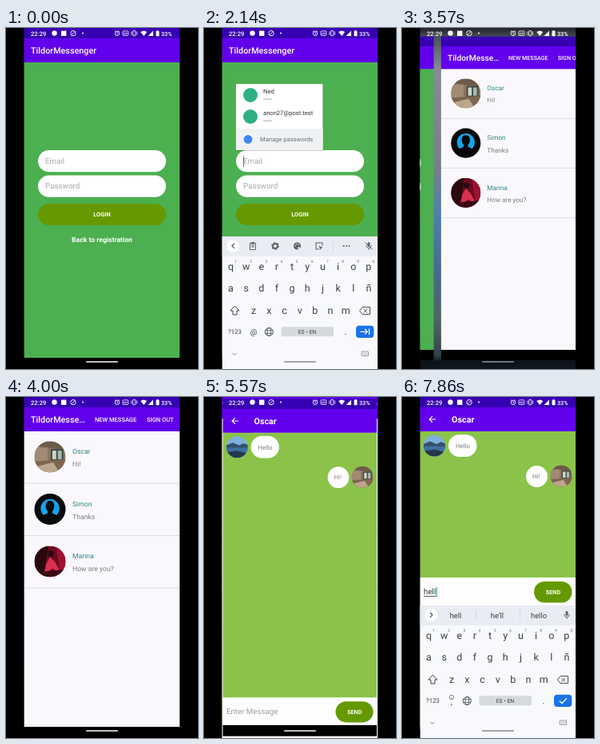
An HTML page for the animation above (8000 ms loop, 240 by 427 pixels).

```html
<!DOCTYPE html>
<html lang="en">
<head>
<meta charset="utf-8">
<title>Messenger walkthrough</title>
<style>
  html, body { margin: 0; width: 100%; height: 100%; overflow: hidden; background: #000; }
  svg { display: block; width: 100vw; height: 100vh; font-family: Roboto, sans-serif; text-rendering: geometricPrecision; }
</style>
</head>
<body>
<svg id="stage" viewBox="0 0 240 427" preserveAspectRatio="none"></svg>
<script>
const LOOP = 8000, STEP = 1000 / 7;
const L = 22.5, W = 194.5;
const PURPLE = '#6200ee', DEEP = '#3700b3', OLIVE = '#669900', CURSOR = '#2b8f9a';
const APP = 'TildorMessenger', SHORT = 'TildorMesse…', FRIEND = 'Oscar', MAIL = 'anon27@post.test';

// --- drawing helpers ---
const rect = (x, y, w, h, fill, r = 0, more = '') =>
  `<rect x="${x}" y="${y}" width="${w}" height="${h}" rx="${r}" fill="${fill}" ${more}/>`;
const circle = (x, y, r, fill, more = '') => `<circle cx="${x}" cy="${y}" r="${r}" fill="${fill}" ${more}/>`;
const text = (x, y, size, fill, str, more = '') =>
  `<text x="${x}" y="${y}" font-size="${size}" fill="${fill}" ${more}>${str}</text>`;
const line = (d, color, w = 1, more = '') =>
  `<path d="${d}" fill="none" stroke="${color}" stroke-width="${w}" ${more}/>`;
const shape = (d, fill) => `<path d="${d}" fill="${fill}"/>`;
const at = (x, y, body, s = 1) => `<g transform="translate(${x} ${y}) scale(${s})">${body}</g>`;
const group = (id, body, more = '') => `<g id="${id}" ${more}>${body}</g>`;
const MID = 'text-anchor="middle"', BOLD = 'font-weight="700"', MEDIUM = 'font-weight="500"';

const frame = (page, body) =>
  rect(L, 0, W, 13.2, DEEP) + rect(L, 13, W, 30, PURPLE) + rect(L, 43, W, 370, page) +
  body + rect(L, 413, W, 14, '#000');

// --- round pictures, drawn in a unit of radius 20 ---
const photo = body => `<g clip-path="url(#round)">${body}</g>`;
const room = photo(
  rect(-20, -20, 40, 40, '#8a7460') + shape('M-20-20H20V-9L-20-14Z', '#6d5a48') +
  rect(-20, -12, 17, 18, '#a08a72') + rect(1, -10, 16, 15, '#3c4a44') + rect(3, -8, 5, 11, '#cfd6c8') +
  rect(10, -8, 5, 11, '#a9b8ab') + shape('M-20 6L20 3V20H-20Z', '#7c6650') + shape('M-16 12L4 7L12 20H-10Z', '#bca78d'));
const person = circle(0, 0, 20, '#080808') + circle(0, -1, 12, '#14a3ee') +
  shape('M-5.5-5a5.5 6 0 0 1 11 0c0 4-1 6-2.5 7v3l6 3c-5 4.500-13 4.500-18 0l6-3v-3c-1.500-1-2.500-3-2.500-7Z', '#080808');
const dancer = photo(
  rect(-20, -20, 40, 40, '#6e0a20') + shape('M-20-20H-2L-8 20H-20Z', '#2a0810') + shape('M8-20H20V20H14Z', '#a01030') +
  circle(1, -10, 4, '#2c0a12') + shape('M0-6L6 0L15 16L3 9L-8 18L-5 3Z', '#d8304f') + shape('M-20 14L20 10V20H-20Z', '#3a0814'));
const lake = photo(
  rect(-20, -20, 40, 40, '#7fb0dc') + shape('M-20-3L-8-8L4-3L12-7L20-4V5H-20Z', '#35506a') +
  rect(-20, 1, 40, 19, '#3f6f9e') + shape('M-20 10L0 7L20 12V20H-20Z', '#25384a'));

// --- login page ---
const field = (y, id, hint) => rect(40, y, 160, 27.3, '#fff', 13.6) +
  text(49, y + 17, 9.8, '#a9a9a9', hint, `id="${id}"`);
const login = frame('#4caf50',
  text(31, 32, 10.8, '#fff', APP, MEDIUM) + field(153, 'mail', 'Email') + field(184.4, 'pass', 'Password') +
  rect(49, 160, 1, 14, CURSOR, 0, 'id="mailCursor"') +
  rect(40, 220, 160, 27, OLIVE, 13.5) + text(120, 236, 7.4, '#fff', 'LOGIN', MID + BOLD) +
  text(120, 268, 8.6, '#fff', 'Back to registration', MID + ' ' + BOLD));

const saved = (y, name) => circle(58, y, 9, '#2fb083') + text(74, y - 1.6, 7.6, '#333', name) +
  text(74, y + 7, 5.2, '#444', '••••••');
const popup = rect(40, 71, 109, 83, '#000', 1, 'opacity=".2"') + rect(40, 70, 108.5, 83, '#fff', 1) +
  saved(84, 'Ned') + saved(111, MAIL) + rect(40, 126, 108.5, 27, '#eff1f3') +
  circle(55, 139.5, 5.4, '#4285f4') + text(70, 142.2, 7.6, '#6b6f74', 'Manage passwords');

// --- list page ---
const chatRow = (y, pic, name, msg) => at(55, y, pic, .975) +
  text(83, y - 4, 8.65, '#2f8587', name) + text(83, y + 12, 8.65, '#7b7b7b', msg) +
  rect(L, y + 32.5, W, 1, '#dedce0');
const list = frame('#faf8fc',
  text(31, 32, 10.8, '#fff', SHORT, MEDIUM) + text(111, 31, 7.5, '#fff', 'NEW MESSAGE', MEDIUM) +
  text(176, 31, 7.5, '#fff', 'SIGN OUT', MEDIUM) +
  chatRow(75, room, FRIEND, 'Hi!') + chatRow(140.5, person, 'Simon', 'Thanks') + chatRow(206, dancer, 'Marina', 'How are you?'));

// --- chat page ---
const chat = frame('#8bc34a',
  line('M42 28H34.500M38 24.200L34.200 28L38 31.800', '#fff', 1.1) + text(62, 32, 10.8, '#fff', FRIEND, BOLD) +
  at(40.5, 61, lake, .68) + rect(58, 47, 35.5, 28, '#fff', 14) + text(67, 64, 7.8, '#7a7a7a', 'Hello') +
  at(199, 99, room, .68) + rect(155, 86, 27, 27, '#fff', 13.5) + text(163, 102, 7.8, '#7a7a7a', 'Hi!') +
  group('bar', rect(L, 226, W, 190, '#fdfdfd') + text(27, 247, 9.8, '#a0a0a0', '', 'id="draft"') +
    rect(27, 238, 1, 12.5, CURSOR, 0, 'id="draftCursor"') + rect(27, 249, 0, .8, '#333', 0, 'id="under"') +
    rect(165, 231, 47.5, 26.5, OLIVE, 13.2) + text(189, 247, 7.3, '#fff', 'SEND', MID + ' ' + BOLD)));

// --- keyboard ---
const INK = '#3c4043', DIM = '#5f6368';
const icon = {
  clip: line('M-3.500-3.500H3.500V4.500H-3.500ZM-1.800-1H1.800M-1.800 1H1.800', DIM, 1) + rect(-1.7, -5, 3.4, 2.6, DIM),
  gear: circle(0, 0, 3, 'none', `stroke="${DIM}" stroke-width="2"`) +
    circle(0, 0, 4.3, 'none', `stroke="${DIM}" stroke-width="1.200" stroke-dasharray="1.900 2.600"`),
  palette: circle(0, 0, 4.6, DIM) + circle(-2.3, -.5, .8, '#e9ecf2') + circle(-.8, -2.5, .8, '#e9ecf2') +
    circle(1.8, -2, .8, '#e9ecf2') + circle(2.2, 2.5, 1.5, '#e9ecf2'),
  page: line('M4-.500V-4H-4V4H0', DIM, 1.1) + shape('M-.500-.500L4.500 2L2.300 2.700L1.500 5Z', DIM),
  sticker: line('M-4-4H4V1L1 4H-4Z', DIM, 1.1) + circle(-1.6, -1, .7, DIM) + circle(1.6, -1, .7, DIM) + line('M-2 1Q0 3 2 1', DIM, .8),
  dots: [-3.4, 0, 3.4].map(x => circle(x, 0, 1, DIM)).join(''),
  mic: rect(-1.5, -5, 3, 6, DIM, 1.5) + line('M-3.200-1Q-3.200 2.700 0 2.700Q3.200 2.700 3.200-1M0 2.700V5', DIM, .9),
};
icon.micOff = icon.mic + line('M-4.500-4.500L4.500 4.500', DIM, 1);
const tool = (x, name) => at(x, 273, icon[name]);
const sep = x => rect(x, 267, .6, 12, '#c9ccd2');
const colX = i => 33.5 + i * 19.15;
const key = (x, y, c, size = 12.5) => text(x, y, size, INK, c, MID);
const keys = [...'qwertyuiop'].map((c, i) => key(colX(i), 303, c) + text(colX(i) + 6, 294, 4.8, DIM, (i + 1) % 10, MID)).join('') +
  [...'asdfghjklñ'].map((c, i) => key(colX(i), 330, c)).join('') +
  [...'zxcvbnm'].map((c, i) => key(colX(i + 1.5), 357.500, c)).join('');
const keyboard = rect(L, 261, W, 240, '#f8f9fc') + rect(L, 261, W, 25, '#e9ecf2') + circle(36.5, 272.8, 8, '#fff') +
  line('M38 269.800L35 272.800L38 275.800', INK, 1.1, 'id="fold"') +
  group('toolsA', tool(61, 'clip') + tool(89, 'gear') + tool(116.5, 'palette') + tool(144, 'page') + sep(161) + tool(178, 'dots') + tool(206, 'micOff')) +
  group('toolsB', tool(61, 'sticker') + text(89, 275.7, 7.4, DIM, 'GIF', MID + ' ' + BOLD) + tool(116.5, 'clip') + tool(144, 'gear') + sep(161) + tool(178, 'dots') + tool(206, 'mic')) +
  group('words', [67, 119, 171].map((x, i) => text(x, 276.5, 9.4, INK, '', `${MID} id="word${i}"`)).join('') + sep(92) + sep(147) + tool(206, 'mic')) +
  keys +
  line('M38.500 348L44 354H41V359H36V354H33Z', INK, 1) +
  line('M198 349.500H207.500V358.500H198L194.500 354ZM199.500 352L204 356.500M204 352L199.500 356.500', INK, .9) +
  key(38.5, 383, '?123', 7.8) +
  group('atKey', key(62, 383.5, '@', 9.6)) +
  group('commaKey', key(62, 385, ',', 10) + circle(62, 376, 2.7, 'none', `stroke="${DIM}" stroke-width=".7"`) + line('M60.600 376.700Q62 378.400 63.400 376.700', DIM, .6)) +
  circle(81.3, 380.5, 5, 'none', `stroke="${INK}" stroke-width=".9"`) +
  `<ellipse cx="81.300" cy="380.500" rx="2.200" ry="5" fill="none" stroke="${INK}" stroke-width=".8"/>` +
  line('M76.600 378.700H86M76.600 382.300H86', INK, .7) +
  rect(96.5, 374.3, 65.5, 12, '#d6d9de', 2) + text(129, 383, 6.9, INK, 'ES • EN', MID) +
  key(177, 384, '.', 11) + rect(190, 372.7, 22.3, 15.3, '#1a73e8', 4) +
  line('M195.500 380.300H204M201 377L204.300 380.300L201 383.600M206.500 376.500V384', '#fff', 1.2, 'id="nextMark"') +
  line('M196.800 380.500L199.800 383.500L206 377.300', '#fff', 1.3, 'id="doneMark"');

const navKeys = line('M35.500 407L38 409.500L40.500 407', 'currentColor', 1) +
  rect(197, 405, 8.5, 5.5, 'none', .6, 'stroke="currentColor" stroke-width=".8"') +
  line('M198.500 407H204.500M198.500 408.800H204.500', 'currentColor', .8, 'stroke-dasharray="1 .700"');

// --- status bar ---
const wave = 'stroke-linecap="round"';
const status = text(31, 9.6, 7.6, '#fff', '22:29', MEDIUM) + circle(60.5, 6.5, 3.2, '#fff') + rect(69, 3.5, 6.4, 6.4, '#fff') +
  circle(84, 6.6, 3.2, 'none', 'stroke="#fff" stroke-width=".9"') + line('M81.900 8.800L86.200 4.400', '#fff', .9) + circle(96, 6.6, 1, '#fff') +
  circle(139, 6.8, 2.7, 'none', 'stroke="#fff" stroke-width=".9"') + line('M139 5.200V7L140.200 7.700M135.800 4.600L137.400 3.300M142.200 4.600L140.600 3.300', '#fff', .8) +
  rect(146, 3.8, 6.8, 5.6, 'none', .8, 'stroke="#fff" stroke-width=".8"') + line('M147.500 8V6.500M149 8V5.500M150.800 8V5.500', '#fff', .8) +
  rect(158.6, 3.5, 3.2, 6.2, 'none', .6, 'stroke="#fff" stroke-width=".9"') + line('M156.800 4.800V8.300M163.600 4.800V8.300', '#fff', .8, wave) +
  shape('M168.200 5Q172.200 1.800 176.200 5L172.200 10Z', '#fff') + shape('M177.500 10H184V3.400Z', '#fff') +
  rect(187.5, 3.8, 4, 6.4, '#fff', .6) + rect(188.6, 3, 1.8, 1, '#fff') + text(194, 9.6, 7.2, '#fff', '33%', MEDIUM);

const wallStops = [[0, '#20222a'], [.03, '#50545e'], [.12, '#868b95'], [.42, '#777f8c'], [.55, '#4f80ad'],
  [.72, '#48698a'], [.86, '#4d6660'], [.96, '#34424a'], [.98, '#0c1218'], [1, '#10181f']];

const stage = document.getElementById('stage');
stage.innerHTML = `<defs>
  <clipPath id="phone"><rect x="${L}" y="0" width="${W}" height="427"/></clipPath>
  <clipPath id="round"><circle r="20"/></clipPath>
  <linearGradient id="hills" x2="0" y2="1">${wallStops.map(([o, c]) => `<stop offset="${o}" stop-color="${c}"/>`).join('')}</linearGradient>
  </defs>` + rect(0, 0, 240, 427, '#000') +
  group('screen', rect(L, 0, W, 427, 'url(#hills)') + group('login', login) + group('list', list) + group('chat', chat) +
    group('keyboard', keyboard) + group('navKeys', navKeys) + group('popup', popup) + status +
    rect(100, 417.2, 40, 1.6, '#fff', .8, 'id="pill"') +
    circle(0, 0, 6, '#fff', 'id="dot" fill-opacity=".350" stroke="#8a8a8a" stroke-opacity=".700" stroke-width=".800"'), 'clip-path="url(#phone)"');

const el = {};
stage.querySelectorAll('[id]').forEach(n => el[n.id] = n);
const show = (id, on) => el[id].setAttribute('visibility', on ? 'visible' : 'hidden');
const set = (id, name, v) => el[id].setAttribute(name, v);
const label = (id, s) => { if (el[id].textContent !== s) el[id].textContent = s; };

// --- motion helpers ---
const clamp = v => Math.max(0, Math.min(1, v));
const span = (t, start, length) => clamp((t - start) / length);
function bezier(x1, y1, x2, y2) {
  const curve = (a, b, s) => 3 * (1 - s) ** 2 * s * a + 3 * (1 - s) * s * s * b + s ** 3;
  return x => {
    let lo = 0, hi = 1;
    for (let i = 0; i < 24; i++) {
      const m = (lo + hi) / 2;
      if (curve(x1, x2, m) < x) lo = m; else hi = m;
    }
    return x <= 0 ? 0 : x >= 1 ? 1 : curve(y1, y2, hi);
  };
}
const slideEase = bezier(.2, 0, 0, 1), growEase = bezier(.4, 0, .2, 1), openEase = bezier(.05, .7, .1, 1);
function track(rows, t) {
  if (t <= rows[0][0]) return rows[0].slice(1);
  const i = rows.findIndex(r => r[0] > t);
  if (i < 0) return rows[rows.length - 1].slice(1);
  const a = rows[i - 1], b = rows[i], p = (t - a[0]) / (b[0] - a[0]);
  return a.slice(1).map((v, j) => v + (b[j + 1] - v) * p);
}
const place = (id, dx, s) => set(id, 'transform', `translate(${120 + dx} 213.5) scale(${s}) translate(-120 -213.5)`);

// time, keyboard opacity, keyboard drop
const KEYBOARD = [[860, 0, 66], [1000, .44, 42], [1143, .86, 9], [1270, 1, 0], [3200, 1, 0], [3400, 0, 60],
  [6440, 0, 60], [6571, .74, 10], [6700, 1, 0]];
// x, y, press, release
const TAPS = [[161.5, 170, 700, 1100], [105, 111, 2280, 2500], [130, 233, 2990, 3200], [164, 88, 5280, 5500],
  [75, 396, 6130, 6350], [129, 326, 7280, 7360], [71.8, 299, 7420, 7500], [186.7, 326, 7560, 7640], [186.7, 326, 7705, 7780]];
const TYPED = [7280, 7420, 7560, 7705];
const WORDS = [['h', 'hi', 'hello'], ['he', 'hey', 'hello'], ['hel', 'help', 'hello'], ['hell', "he'll", 'hello']];
const FILL = 2560, SLIDE = 3312, OPEN = 5400, RESIZE = 6500;

function draw(t) {
  const inChat = t >= OPEN;

  // login form
  const filled = t >= FILL;
  label('mail', filled ? MAIL : 'Email');
  label('pass', filled ? '••••••' : 'Password');
  ['mail', 'pass'].forEach(id => set(id, 'fill', filled ? '#333' : '#a9a9a9'));
  show('mailCursor', t > 850 && !filled);
  set('popup', 'opacity', span(t, 1800, 200) * (filled ? 0 : 1));

  // one page pushes the other out to the left
  const shift = slideEase(span(t, SLIDE, 500));
  place('login', -194 * shift, 1 - .05 * growEase(span(t, SLIDE, 283)));
  const grown = .95 + .05 * growEase(span(t, SLIDE + 283, 317));
  show('login', t < SLIDE + 600);

  // the chat grows over the list
  const opened = openEase(span(t, OPEN, 400));
  place('list', 194 * (1 - shift), grown + .1 * opened);
  show('list', t >= SLIDE && t < OPEN + 400);
  place('chat', 0, .85 + .15 * opened);
  set('chat', 'opacity', span(t, OPEN + 35, 83));

  // message being typed
  const n = TYPED.filter(k => t >= k).length;
  set('bar', 'transform', `translate(0 ${t < RESIZE ? 152 : 0})`);
  label('draft', n ? 'hell'.slice(0, n) : 'Enter Message');
  set('draft', 'fill', n ? '#333' : '#a0a0a0');
  const width = n ? el.draft.getComputedTextLength() : 0;
  set('under', 'width', width);
  set('draftCursor', 'x', 27.4 + width);
  show('draftCursor', t > 6350);

  // keyboard
  const [alpha, drop] = track(KEYBOARD, t);
  set('keyboard', 'opacity', alpha);
  set('keyboard', 'transform', `translate(0 ${drop})`);
  show('toolsA', !inChat);
  show('toolsB', inChat && !n);
  show('words', n > 0);
  if (n) WORDS[n - 1].forEach((w, i) => label('word' + i, w));
  set('fold', 'd', n ? 'M35 269.8L38 272.8L35 275.8' : 'M38 269.8L35 272.8L38 275.8');
  show('atKey', !inChat);
  show('commaKey', inChat);
  show('nextMark', !inChat);
  show('doneMark', inChat);
  show('navKeys', alpha > 0);
  set('navKeys', 'color', alpha < 1 ? '#fff' : '#80868b');
  set('pill', 'fill', alpha === 1 ? '#85898e' : t > SLIDE && t < SLIDE + 560 ? '#8d9298' : '#fff');

  // finger
  const tap = TAPS.find(p => t >= p[2] && t < p[3] + 60);
  show('dot', !!tap);
  if (tap) {
    set('dot', 'cx', tap[0]);
    set('dot', 'cy', tap[1]);
  }
}

let start;
function tick(now) {
  start ??= now;
  draw(Math.floor(((now - start) % LOOP + 6) / STEP) * STEP % LOOP);
  requestAnimationFrame(tick);
}
draw(0);
requestAnimationFrame(tick);
</script>
</body>
</html>
```
